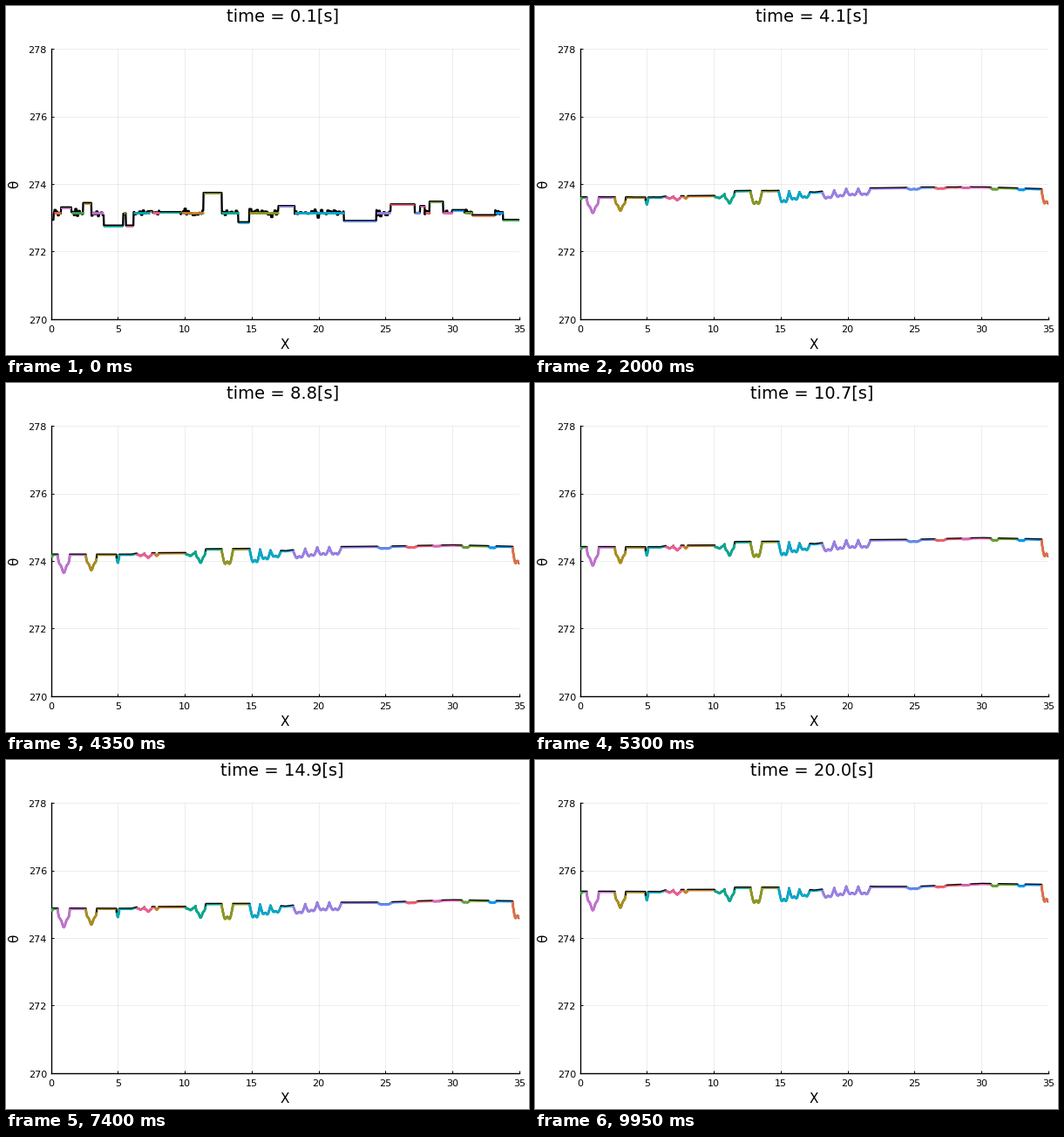
Write a matplotlib script that moves like this. It is 600 px wide and 400 px high and loops after 10 s.

```python
import numpy as np
import matplotlib.pyplot as plt
from matplotlib.animation import FuncAnimation
from matplotlib.collections import LineCollection

W, H, DPI = 600, 400, 100
FRAMES, INTERVAL = 200, 50
LEFT, RIGHT, TOP, BOTTOM = 51.75, 588.75, 49.3, 358.75
PX = 8 / (BOTTOM - TOP)      # degrees per pixel
PT = 72 / DPI                # points per pixel
plt.rcParams["font.family"] = "DejaVu Sans"

PALETTE = ["#009afa", "#e36f47", "#3ea44e", "#c371d2",
           "#ac8e18", "#00aaae", "#ed5e93", "#c68225",
           "#00a98d", "#8e971e", "#00a9cc", "#9b7fe9",
           "#618df6", "#f06073", "#dd65b6", "#6c9f33"]
MIXED = 273.15

# Calm layers at the start: from, to, temperature; mixed air fills the gaps
CALM = [
    (.75, 1.5, 273.31), (2.4, 3, 273.44), (3.95, 5.38, 272.77),
    (5.58, 6.15, 272.77), (7.4, 7.55, 273.2), (8.1, 9.7, 273.17),
    (11.4, 12.75, 273.74), (14, 14.8, 272.87), (17, 18.2, 273.35),
    (21.9, 24.3, 272.91), (25.4, 27.2, 273.4), (27.6, 27.95, 273.35),
    (28.3, 29.3, 273.48), (30, 30.9, 273.23), (31.5, 33.2, 273.08),
    (33.8, 35, 272.94),
]
# Plumes: from, to, lobes, depth of first and last lobe
PLUMES = [
    (0, .15, 1, .05, .05), (.5, 1.4, 1, .48, .48), (2.6, 3.42, 1, .41, .41),
    (4.88, 5.1, 1, .22, .22), (6.4, 7.55, 2, .07, .12),
    (7.75, 8.05, 1, .07, .07), (10.05, 11.56, 2, .1, .33),
    (12.75, 13.6, 1, .45, .45), (14.85, 17.18, 3, .4, .2),
    (18.1, 21.7, 4, .25, .22), (24.4, 25.5, 1, .06, .06),
    (26.5, 27.4, 1, .04, .04), (28.5, 29.2, 1, .02, .02),
    (30.7, 31.3, 1, .06, .06), (32.7, 33.3, 1, .05, .05),
    (34.5, 35.25, 1, .5, .5),
]
# Plateau height above the western end, early and late
KNOTS = [0, 6, 6.5, 10, 11.6, 15.8, 17.5, 20, 22, 25, 30, 35]
EARLY = [0, 0, .03, .04, .18, .2, .14, .26, .27, .29, .3, .24]
LATE = [0, -.01, .05, .05, .12, .12, .03, .16, .14, .14, .23, .2]

x = np.linspace(0, 35, 1401)
rng = np.random.default_rng(4)


def colour(k):
    return PALETTE[k % len(PALETTE)]


def base(t):
    return 273.044 + .1405 * t - .00121 * t * t


def first_profile():
    """Calm steps joined by unsteady mixed air."""
    blocks = rng.normal(0, .05, 300)
    y = MIXED + blocks[(x / .12).astype(int)]
    y[x < .2] = CALM[-1][2]
    for x0, x1, level in CALM:
        y[(x >= x0) & (x <= x1)] = level
    return y


def lobe(x0, x1, ripple):
    s = np.clip((x - x0) / (x1 - x0), 0, 1)
    return np.sin(np.pi * s).clip(0) ** .6 * (1 + ripple * np.cos(4 * np.pi * s))


def plume_drop():
    """Narrow wells peak in the west and split in two in the east."""
    total = np.zeros_like(x)
    for x0, x1, n, first, last in PLUMES:
        edges = np.linspace(x0, x1, n + 1)
        for a, b, depth in zip(edges, edges[1:], np.linspace(first, last, n)):
            total += depth * lobe(a, b, .15 * np.sign(12 - x0))
    return total


start = first_profile()
drop = plume_drop()
early, late = np.interp(x, KNOTS, EARLY), np.interp(x, KNOTS, LATE)


def settled(t):
    """Profile after the first mixing has died away."""
    age = max(t - 4.1, 0)
    u = (1 - np.exp(-age / 24)) / (1 - np.exp(-15.9 / 24))
    depth = 1 - .15 * np.exp(-age / 2.5)
    return base(t) + early + (late - early) * u - drop * depth


def piece(x0, x1, y):
    i, j = np.searchsorted(x, [x0 - 1e-9, x1 + 1e-9])
    return np.column_stack([x[i:j], y[i:j]])


fig = plt.figure(figsize=(W / DPI, H / DPI), dpi=DPI, facecolor="white")
ax = fig.add_axes([LEFT / W, 1 - BOTTOM / H,
                   (RIGHT - LEFT) / W, (BOTTOM - TOP) / H])
ax.set(xlim=(0, 35), ylim=(270, 278),
       xticks=range(0, 36, 5), yticks=range(270, 279, 2))
ax.set_axisbelow(True)
ax.grid(color="black", alpha=.1, lw=.5)
ax.tick_params(direction="in", length=2.2, width=.7,
               labelbottom=False, labelleft=False)
ax.spines[["top", "right"]].set_visible(False)
ax.spines[["left", "bottom"]].set_linewidth(1)


def label(px, py, text, size, **kw):
    kw = {"ha": "center", "va": "baseline", **kw}
    return fig.text(px / W, 1 - py / H, text, fontsize=size, **kw)


for v in range(0, 36, 5):
    label(LEFT + v * (RIGHT - LEFT) / 35, 374, str(v), 8)
for v in range(270, 279, 2):
    label(47, BOTTOM - (v - 270) / PX + 4.8, str(v), 8, ha="right")
label(320, 393, "X", 11)
label(10, 204, "θ", 11, rotation=90, va="center")
title = label(317.2, 18, "", 14)

mean, = ax.plot([], [], color="black", lw=2.3 * PT, zorder=3)
thin = LineCollection([], linewidths=1.5 * PT, zorder=4)
thick = LineCollection([], linewidths=2.8 * PT, zorder=5, joinstyle="round")
ax.add_collection(thin, autolim=False)
ax.add_collection(thick, autolim=False)


def paint(lines, parts):
    lines.set_segments([p for p, _ in parts])
    lines.set_color([c for _, c in parts])


def layer_parts(w, heat, rest):
    """Calm layers and the mixed gaps before each of them."""
    def blend(level):
        return w * (level + heat) + (1 - w) * rest

    fine = [(piece(a, b, blend(level - PX)), colour(k + 3))
            for k, (a, b, level) in enumerate(CALM)]
    ends = [.2] + [b for _, b, _ in CALM]
    bold = [(piece(end, a, blend(MIXED)), colour(k + 1))
            for k, (end, (a, _, _)) in enumerate(zip(ends, CALM))]
    return fine, bold


def plume_parts(y):
    """Each plume, and the flat that follows it in the same colour."""
    nexts = [p[0] for p in PLUMES[1:]] + [35]
    fine = [(piece(p[1], end, y - .6 * PX), colour(k + 2))
            for k, (p, end) in enumerate(zip(PLUMES, nexts)) if p[1] < end]
    bold = [(piece(p[0], p[1], y), colour(k + 2))
            for k, p in enumerate(PLUMES)]
    return fine, bold


def draw(i):
    t = (i + 1) / 10
    title.set_text(f"time = {t:.1f}[s]")
    w = np.exp(-(t - .1) / .9)
    heat = base(t) - base(.1)
    rest = settled(t)
    y = w * (start + heat) + (1 - w) * rest
    mean.set_data(x, y + .3 * PX * (1 - w))
    fine, bold = layer_parts(w, heat, rest) if t < 1 else plume_parts(y)
    paint(thin, fine)
    paint(thick, bold)
    return title, mean, thin, thick


anim = FuncAnimation(fig, draw, frames=FRAMES, interval=INTERVAL,
                     repeat=True, repeat_delay=0, blit=False)
plt.show()
```
